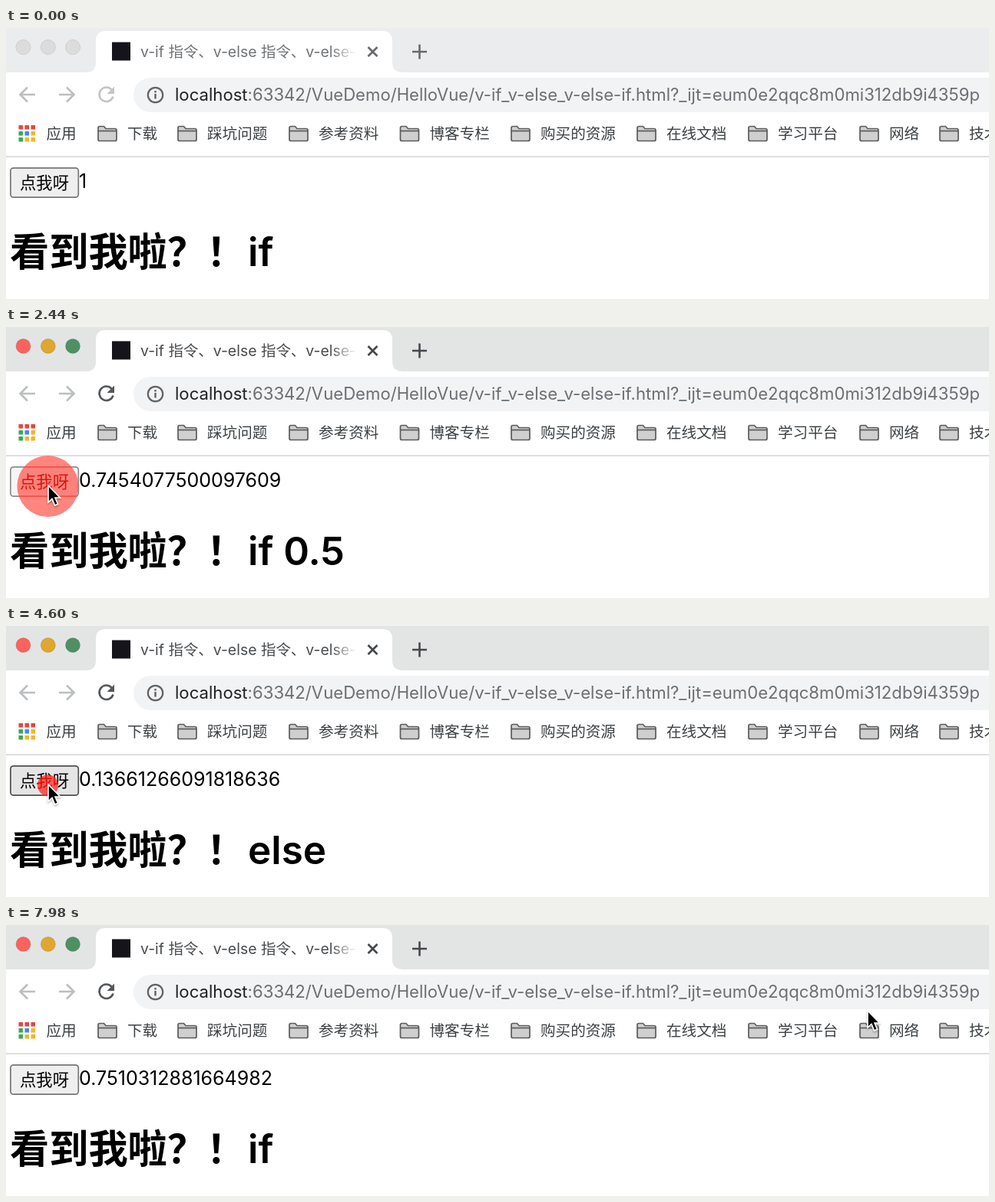
Animation of 1280x354 px, one loop 8000 ms. Source, as an HTML page:

```html
<!DOCTYPE html>
<html lang="zh-CN">
<head>
<meta charset="utf-8">
<title>v-if</title>
<style>
  html, body { margin: 0; width: 100%; height: 100%; overflow: hidden; background: #fff; }
  svg {
    display: block; width: 1280px; height: 354px; isolation: isolate;
    font-family: Inter, "Noto Sans CJK SC", "Noto Sans CJK", sans-serif;
    --frame: #ebecee; --title: #707376; --icon: #67696c; --reload: #c3c5c7;
    --red: #dcdcdc; --yellow: #dcdcdc; --green: #dcdcdc; --rim: #cecece;
  }
  svg.active {
    --frame: #e3e5e4; --title: #484b4e; --icon: #45484b; --reload: #54575b;
    --red: #fc625d; --yellow: #dfa72e; --green: #4d9162; --rim: #0002;
  }
  text { white-space: pre; }
  .line { fill: none; stroke-width: 2.6; }
  .icon { stroke: var(--icon); }
  .light { stroke: var(--rim); stroke-width: 1; }
  .marks { font-size: 19.6px; fill: #3c4043; }
  .heading { font-size: 51.2px; font-weight: 600; }
  #button { fill: #efefef; stroke: #767676; stroke-width: 1.7; }
  #button.hover { fill: #e5e5e5; stroke: #4f4f4f; }
  #button.down { fill: #f5f5f5; stroke: #8d8d8d; }
  #glow { mix-blend-mode: screen; fill: rgb(215, 40, 20); }
  #tint { mix-blend-mode: multiply; }
</style>
</head>
<body>
<svg id="stage" viewBox="0 0 1280 354">
  <defs>
    <linearGradient id="fade" gradientUnits="userSpaceOnUse" x1="422" x2="457">
      <stop stop-color="#fff"/><stop offset="1" stop-color="#000"/>
    </linearGradient>
    <mask id="clip" maskUnits="userSpaceOnUse" x="170" y="10" width="290" height="40">
      <rect x="170" y="10" width="290" height="40" fill="url(#fade)"/>
    </mask>
    <g id="folder" stroke="#5b5b5b" stroke-width="1.7" fill="#cfcfcf">
      <path d="M1 18V3Q1 1 3 1H8.500L11 4H23Q25 4 25 6V18Q25 20 23 20H3Q1 20 1 18Z"/>
      <path d="M1 7H25"/>
    </g>
    <filter id="shadow" x="-50%" y="-30%" width="200%" height="180%">
      <feDropShadow dx="0" dy="1.5" stdDeviation="1.3" flood-opacity=".35"/>
    </filter>
  </defs>

  <rect width="1280" height="354" fill="#fff"/>

  <!-- Tab strip -->
  <rect width="1280" height="58" fill="var(--frame)"/>
  <path fill="#fff" d="M104 58Q117 58 117 45V17Q117 4 130 4H490Q503 4 503 17V45Q503 58 516 58Z"/>
  <g class="light">
    <circle cx="22.500" cy="25" r="9.500" fill="var(--red)"/>
    <circle cx="54.800" cy="25" r="9.500" fill="var(--yellow)"/>
    <circle cx="87" cy="25" r="9.500" fill="var(--green)"/>
  </g>
  <rect x="138" y="18.500" width="24" height="24" fill="#15141a"/>
  <text x="175" y="37.500" font-size="19.450" fill="var(--title)" mask="url(#clip)">v-if 指令、v-else 指令、v-else-if 指令</text>
  <path class="line icon" d="M471.500 25L483.500 37M483.500 25L471.500 37"/>
  <path class="line icon" d="M529 31H548M538.500 21.500V40.500"/>

  <!-- Toolbar -->
  <rect x="166" y="65" width="1140" height="45" rx="22.500" fill="#f1f3f4"/>
  <g class="line" stroke="#bcbec0">
    <path d="M38 87H19M28 77.500L18.500 87L28 96.500"/>
    <path d="M69 87H88M79 77.500L88.500 87L79 96.500"/>
  </g>
  <path class="line" stroke="var(--reload)" d="M137.500 80.500A9.200 9.200 0 1 0 139.500 89.500"/>
  <path fill="var(--reload)" d="M141 76.500V86H131.500Z"/>
  <circle class="line" cx="194.500" cy="87.500" r="9.700" stroke="#5f6368" style="stroke-width:2.2"/>
  <path fill="#5f6368" d="M193.300 86H195.700V92.500H193.300ZM193.300 82H195.700V84.400H193.300Z"/>
  <text x="220" y="95" font-size="22.150" fill="#6b6f74"><tspan fill="#202124">localhost</tspan>:63342/VueDemo/HelloVue/v-if_v-else_v-else-if.html?_ijt=eum0e2qqc8m0mi312db9i4359p</text>

  <!-- Bookmarks -->
  <g id="apps"></g>
  <g id="marks" class="marks"><text x="52.500" y="145">应用</text></g>
  <rect y="167.300" width="1280" height="1.600" fill="#d6d7d8"/>

  <!-- Page -->
  <rect id="button" x="5.900" y="182.800" width="88.400" height="38.400" rx="4"/>
  <text x="18" y="209.500" font-size="21.330">点我呀</text>
  <text id="value" x="95" y="209" font-size="25"></text>
  <text class="heading" x="5" y="311">看到我啦？！</text>
  <text class="heading" id="branch" x="315" y="311"></text>

  <circle id="glow" cx="54.500" cy="208"/>
  <circle id="tint" cx="54.500" cy="208"/>
  <path id="cursor" filter="url(#shadow)" stroke="#fff" stroke-width="1.600" d="M0 0V22L5 17.400L8.600 26L12.500 24.300L9 16H15.500Z"/>
</svg>

<script>
const LOOP = 8000, ACTIVATE = 1180;
const MAX_R = 40.5, GROW = 180, SHRINK = 660, PRESS_LAG = 50;

// [mouse down, mouse up, value after release]
const clicks = [
  [1180, 1300, '1'],
  [1690, 2010, '0.7454077500097609'],
  [2300, 2460, '0.7454077500097609'],
  [2918, 3090, '0.6318204475021936'],
  [3600, 3780, '0.13661266091818636'],
  [4578, 4740, '0.9229988297240221'],
  [5500, 5660, '0.5874031926640528'],
  [5980, 6120, '0.4660877280169775'],
  [6669, 6830, '0.7510312881664982'],
];

// [time, x, y]
const path = [
  [480, 109, 354], [760, 72, 245], [920, 53, 190], [1040, 55, 207],
  [7680, 55, 207], [7970, 1122, 112],
];

const bookmarks = [
  [119, '下载'], [223, '踩坑问题'], [368, '参考资料'], [512.5, '博客专栏'], [657, '购买的资源'],
  [821, '在线文档'], [966, '学习平台'], [1111, '网络'], [1215, '技术'],
];

const $ = id => document.getElementById(id);
const clamp = x => Math.min(1, Math.max(0, x));
const smooth = x => x * x * (3 - 2 * x);

function add(parent, tag, attrs, content = '') {
  const el = document.createElementNS(parent.namespaceURI, tag);
  for (const key in attrs) el.setAttribute(key, attrs[key]);
  el.textContent = content;
  parent.append(el);
}

const [R, G, B, Y] = ['#e2483d', '#3aa757', '#4587ee', '#f3b52c'];
[R, R, R, G, B, Y, G, Y, Y].forEach((fill, i) => add($('apps'), 'rect', {
  x: 16.5 + i % 3 * 8, y: 127 + Math.floor(i / 3) * 8, width: 5.5, height: 5.5, fill,
}));
for (const [x, label] of bookmarks) {
  add($('marks'), 'use', { href: '#folder', x, y: 127.5 });
  add($('marks'), 'text', { x: x + 39, y: 145 }, label);
}

function branch(value) {
  if (value > 0.75) return 'if';
  if (value > 0.5) return 'if 0.5';
  return value > 0.25 ? 'if 0.25' : 'else';
}

function radius(t, [down, up]) {
  if (t < down) return 0;
  const grown = 1 - (1 - clamp((t - down) / GROW)) ** 3;
  return MAX_R * grown * (1 - clamp((t - up) / SHRINK));
}

function position(t) {
  const next = path.findIndex(p => p[0] > t);
  if (next < 0) return path[path.length - 1].slice(1);
  if (next === 0) return null;
  const [t0, x0, y0] = path[next - 1], [t1, x1, y1] = path[next];
  const k = smooth((t - t0) / (t1 - t0));
  return [x0 + (x1 - x0) * k, y0 + (y1 - y0) * k];
}

function setText(el, text) {
  if (el.textContent !== text) el.textContent = text;
}

function draw(t) {
  const active = t >= ACTIVATE;
  $('stage').classList.toggle('active', active);

  const done = clicks.filter(c => t >= c[1]);
  const value = done.length ? done[done.length - 1][2] : '1';
  setText($('value'), value);
  setText($('branch'), branch(+value));

  const at = position(t);
  $('cursor').style.display = at ? '' : 'none';
  if (at) $('cursor').setAttribute('transform', `translate(${at})`);

  const over = active && at[0] < 95 && at[1] > 182;
  const down = clicks.some(c => t >= c[0] + PRESS_LAG && t < c[1]);
  $('button').setAttribute('class', down ? 'down' : over ? 'hover' : '');

  const r = Math.max(...clicks.map(c => radius(t, c)));
  const paleness = 0.27 + 0.25 * clamp(r / 32);
  $('glow').setAttribute('r', r);
  $('tint').setAttribute('r', r);
  $('tint').setAttribute('fill', `rgb(255, ${255 * paleness}, ${245 * paleness})`);
}

const start = performance.now();
function tick() {
  draw((performance.now() - start) % LOOP);
  requestAnimationFrame(tick);
}
tick();
</script>
</body>
</html>
```
